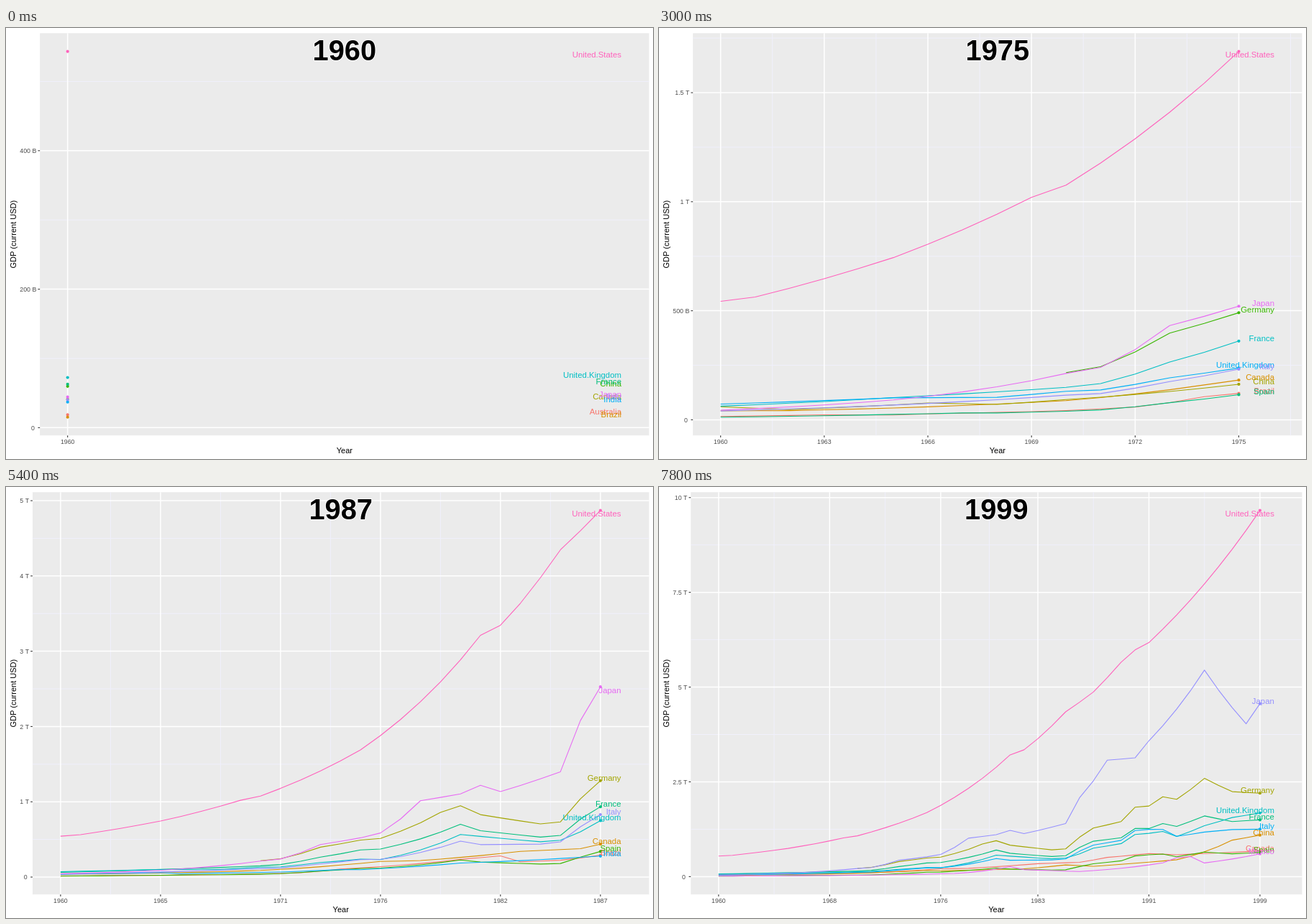
These frames come from a looping animation (900x600 px, 8000 ms). An HTML page with a canvas:

```html
<!DOCTYPE html>
<html lang="en">
<head>
<meta charset="utf-8">
<title>GDP by year</title>
<style>
  html, body { margin: 0; width: 100%; height: 100%; overflow: hidden; background: #fff; }
  canvas { display: block; }
</style>
</head>
<body>
<canvas id="chart" width="900" height="600"></canvas>
<script>
const ctx = document.getElementById('chart').getContext('2d');
const FONT = '"Liberation Sans", Arial, sans-serif';
const FIRST = 1960, YEARS = 40, STEP_MS = 200, TOP = 7.2, BOTTOM = 567.2, RIGHT = 894.5;
const LABEL_GAP = 1.03; // years between the newest point and the country names
const PALETTE = ['#F8766D', '#D89000', '#A3A500', '#39B600', '#00BF7D',
                 '#00BFC4', '#00B0F6', '#9590FF', '#E76BF3', '#FF62BC'];

// Yearly values from a few turning points, with constant growth in between.
function growth(points) {
  const values = [], keys = Object.keys(points).map(Number);
  keys.forEach((from, i) => {
    const to = keys[i + 1] ?? from + 1, ratio = (points[to] ?? 1) / points[from];
    for (let y = from; y < to; y++) values[y - 60] = points[from] * ratio ** ((y - from) / (to - from));
  });
  return values;
}

// GDP in billions. The European economies move with the dollar rate much as
// France does, so they are given as a slowly changing share of its GDP.
const france = growth({ 60: 62.7, 65: 102, 70: 149, 71: 166, 73: 265, 75: 361, 76: 372, 78: 507, 80: 701, 81: 616,
  84: 531, 85: 553, 86: 771, 87: 934, 89: 1025, 90: 1269, 91: 1269, 92: 1401, 93: 1323, 95: 1601, 97: 1453, 99: 1497 });
const likeFrance = shares => growth(shares).map((share, i) => share * france[i]);

// Kept in order of country code, which decides the colours.
const countries = Object.entries({
  'Argentina': growth({ 62: 24.5, 63: 18.3, 64: 25.6, 66: 28.6 }),
  'Australia': growth({ 60: 18.6, 62: 19.8, 66: 27.3, 69: 36.6 }),
  'Brazil': growth({ 60: 15.17, 62: 19.9, 63: 23, 65: 21.8, 66: 27.1, 70: 42.3, 72: 58.5, 74: 106, 80: 235,
    82: 282, 83: 203, 85: 223, 88: 330, 91: 603, 92: 401, 93: 438, 95: 786, 98: 864, 99: 599 }),
  'Canada': growth({ 60: 41, 62: 42, 65: 54, 70: 87.9, 74: 160, 76: 207, 78: 219, 83: 341, 86: 377, 88: 507,
    91: 610, 93: 577, 99: 676 }),
  'China': growth({ 60: 59.7, 62: 47.2, 66: 76.7, 68: 70.8, 70: 92.6, 75: 163, 76: 154, 79: 178, 82: 205,
    85: 309, 87: 273, 91: 383, 93: 445, 97: 962, 99: 1094 }),
  'Germany': likeFrance({ 70: 1.449, 73: 1.5, 75: 1.36, 79: 1.44, 80: 1.352, 85: 1.325, 91: 1.467, 95: 1.619, 99: 1.47 }),
  'Spain': likeFrance({ 60: 0.193, 67: 0.265, 68: 0.245, 75: 0.319, 85: 0.326, 91: 0.454, 93: 0.396, 99: 0.423 }),
  'France': france,
  'United.Kingdom': likeFrance({ 60: 1.154, 65: 0.985, 68: 0.806, 70: 0.877, 73: 0.727, 76: 0.625, 80: 0.806,
    81: 0.878, 85: 0.885, 86: 0.78, 91: 0.9, 93: 0.802, 95: 0.838, 97: 1.073, 99: 1.122 }),
  'India': growth({ 60: 37, 65: 59.6, 66: 45.9, 71: 67.4, 74: 99.5, 75: 98.5, 80: 186, 83: 218, 87: 279 }),
  'Italy': likeFrance({ 60: 0.645, 65: 0.665, 70: 0.759, 73: 0.66, 77: 0.626, 81: 0.7, 84: 0.825, 91: 0.982,
    93: 0.803, 95: 0.734, 97: 0.855, 99: 0.836 }),
  'Japan': growth({ 60: 44.3, 65: 91, 70: 212.6, 71: 240, 73: 432, 75: 521, 76: 586, 78: 1014, 80: 1105, 81: 1219,
    82: 1135, 85: 1399, 86: 2079, 88: 3072, 90: 3133, 91: 3584, 95: 5449, 98: 4033, 99: 4562 }),
  'Mexico': growth({ 60: 13, 70: 35.5, 77: 82, 81: 264, 82: 185, 86: 135, 92: 363, 93: 501, 94: 528, 95: 360, 99: 600 }),
  'Russian.Federation': growth({ 89: 506, 91: 518, 92: 460 }),
  'United.States': growth({ 60: 543.3, 61: 563, 65: 743.7, 69: 1020, 70: 1076, 75: 1689, 81: 3211, 82: 3345,
    83: 3638, 85: 4347, 87: 4870, 89: 5658, 90: 5980, 91: 6174, 99: 9660 })
}).map(([name, values]) => ({ name, values, start: values.findIndex(Number) }));

// Extended Wilkinson axis labelling, aiming at five breaks.
function niceBreaks(lo, hi) {
  let best = { score: -Infinity };
  [1, 5, 2, 2.5, 4, 3].forEach((q, rank) => {
    for (let count = 2; count < 11; count++) {
      const power = Math.ceil(Math.log10((hi - lo) / (count + 1) / q));
      for (const step of [q * 10 ** power, q * 10 ** (power + 1)]) {
        for (let n = Math.floor(hi / step) - count + 1; n <= Math.ceil(lo / step); n++) {
          const first = n * step, last = first + (count - 1) * step;
          const simplicity = (first <= 0 && last >= 0) - rank / 5;
          const coverage = 1 - ((hi - last) ** 2 + (lo - first) ** 2) / 2 / (0.1 * (hi - lo)) ** 2;
          const ratio = (Math.max(last, hi) - Math.min(first, lo)) / step / 4;
          const density = 2 - Math.max(ratio, 1 / ratio);
          const score = 0.25 * simplicity + 0.2 * coverage + 0.5 * density;
          if (score > best.score) best = { score, first, step, count };
        }
      }
    }
  });
  return Array.from({ length: best.count }, (_, i) => best.first + i * best.step);
}

function minorBreaks(breaks) {
  if (breaks.length < 2) return [];
  const end = breaks[breaks.length - 1], gap = breaks[1] - breaks[0];
  return [...breaks.slice(1).map((b, i) => (b + breaks[i]) / 2), end + gap / 2, end + gap];
}

function money(v) {
  if (!v) return '0\u00a0';
  return v < 1000 ? +v.toPrecision(6) + ' B' : +(v / 1000).toPrecision(6) + ' T';
}

function text(str, x, y, size, color, align = 'center', weight = '') {
  ctx.font = `${weight} ${size}px ${FONT}`;
  ctx.textAlign = align;
  ctx.fillStyle = color;
  ctx.fillText(str, x, y);
}

function line(points, color, width) {
  ctx.beginPath();
  points.forEach(([x, y]) => ctx.lineTo(x, y));
  ctx.strokeStyle = color;
  ctx.lineWidth = width;
  ctx.stroke();
}

function draw(now) {
  const n = Math.floor(now / STEP_MS) % YEARS;
  const leaders = countries.filter(c => c.values[n])
    .sort((a, b) => b.values[n] - a.values[n]).slice(0, 10);
  const shown = countries.filter(c => leaders.includes(c));
  const history = shown.flatMap(c => c.values.slice(c.start, n + 1));
  const lo = Math.min(...history), hi = Math.max(...history), pad = (hi - lo) * 0.05;

  const yOf = v => TOP + (hi + pad - v) / (hi - lo + 2 * pad) * (BOTTOM - TOP);
  const inY = v => v > lo - pad && v < hi + pad;
  const yBreaks = niceBreaks(lo - pad, hi + pad);
  const yMajor = yBreaks.filter(inY);

  ctx.font = `8.8px ${FONT}`;
  const left = 24.2 + Math.max(...yMajor.map(v => ctx.measureText(money(v)).width));
  const inset = (RIGHT - left) / 22, middle = (left + RIGHT) / 2;
  const xOf = i => left + inset + i / (n + LABEL_GAP) * inset * 20;
  const xBreaks = [...new Set([0, 1, 2, 3, 4, 5].map(k => Math.round(n * k / 5)))];

  ctx.fillStyle = '#fff';
  ctx.fillRect(0, 0, 900, 600);
  ctx.fillStyle = '#EBEBEB';
  ctx.fillRect(left, TOP, RIGHT - left, BOTTOM - TOP);

  const gridX = (x, color, width) => line([[x, TOP], [x, BOTTOM]], color, width);
  const gridY = (y, color, width) => line([[left, y], [RIGHT, y]], color, width);
  minorBreaks(yBreaks).filter(inY).forEach(v => gridY(yOf(v), '#F0F0FC', 1));
  minorBreaks(xBreaks).map(xOf).filter(x => x < RIGHT).forEach(x => gridX(x, '#F0F0FC', 1));
  yMajor.forEach(v => gridY(yOf(v), '#fff', 1.5));
  xBreaks.forEach(i => gridX(xOf(i), '#fff', 1.5));

  ctx.lineJoin = 'round';
  shown.forEach((c, k) =>
    line(c.values.slice(c.start, n + 1).map((v, i) => [xOf(c.start + i), yOf(v)]), PALETTE[k], 1.1));
  shown.forEach((c, k) => {
    ctx.beginPath();
    ctx.arc(xOf(n), yOf(c.values[n]), 2.1, 0, 7);
    ctx.fillStyle = PALETTE[k];
    ctx.fill();
  });
  // Names lean towards the middle of the panel.
  shown.forEach((c, k) => {
    const y = yOf(c.values[n]);
    text(c.name, RIGHT - inset, y < (TOP + BOTTOM) / 2 ? y + 8.4 : y, 11.38, PALETTE[k], 'right');
  });

  ctx.font = `bold 39.8px ${FONT}`;
  ctx.textAlign = 'center';
  ctx.strokeStyle = '#fff';
  ctx.lineWidth = 2;
  ctx.strokeText(FIRST + n, middle, 45.3);
  text(FIRST + n, middle, 45.3, 39.8, '#000', 'center', 'bold');

  yMajor.forEach(v => {
    line([[left - 2.74, yOf(v)], [left, yOf(v)]], '#333', 1.07);
    text(money(v), left - 4.9, yOf(v) + 3.2, 8.8, '#4D4D4D', 'right');
  });
  xBreaks.forEach(i => {
    line([[xOf(i), BOTTOM], [xOf(i), BOTTOM + 2.74]], '#333', 1.07);
    text(FIRST + i, xOf(i), 579, 8.8, '#4D4D4D');
  });
  text('Year', middle, 592.3, 11, '#000');
  ctx.save();
  ctx.translate(13.7, (TOP + BOTTOM) / 2);
  ctx.rotate(-Math.PI / 2);
  text('GDP (current USD)', 0, 0, 11, '#000');
  ctx.restore();
}

const startTime = performance.now();
function tick() {
  draw(performance.now() - startTime);
  requestAnimationFrame(tick);
}
tick();
</script>
</body>
</html>
```
